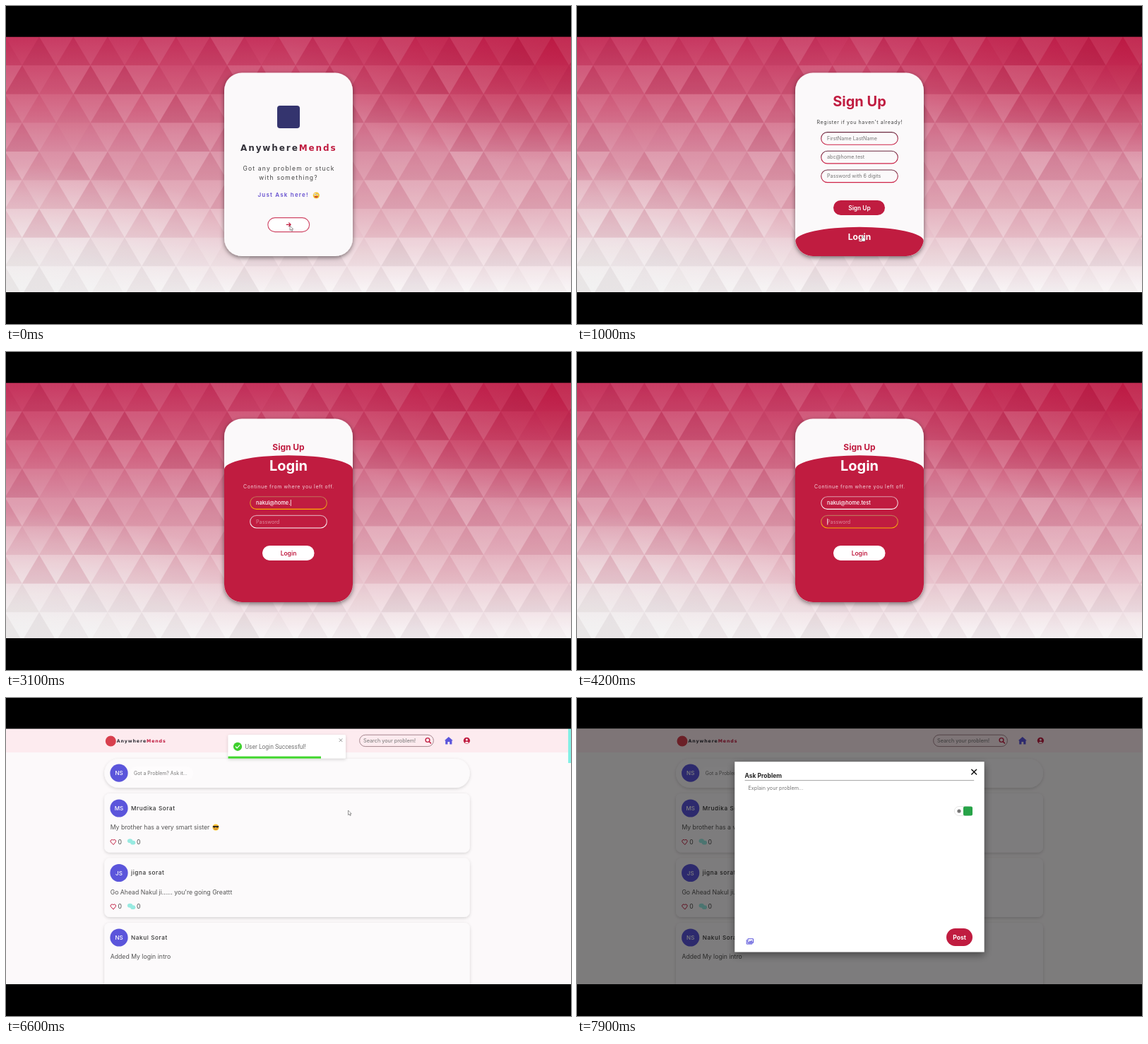
Animation, 800 px wide and 450 px high, one loop 8 s. Source, as an HTML page:

```html
<!DOCTYPE html>
<html lang="en">
<head>
<meta charset="utf-8">
<title>Sign in and ask</title>
<style>
html, body { margin: 0; width: 100%; height: 100%; overflow: hidden; background: #000; }
svg { display: block; width: 800px; height: 450px; }
text { font-family: Inter, "Open Sans", sans-serif; white-space: pre; }
.wide { font-family: "DejaVu Sans", sans-serif; font-weight: 700; }
.toast { font-family: Roboto, sans-serif; }
</style>
</head>
<body>
<svg id="stage" viewBox="0 0 800 450"></svg>
<script>
const LOOP = 8000;
const RED = '#c01c40', PURPLE = '#5b55db', AQUA = '#98eae1';
const EMAIL = 'nakul@home.test';
const stage = document.getElementById('stage');

// Markup helpers. Text is placed by its vertical centre.
const text = (x, y, size, str, fill, o = {}) =>
  `<text x="${x}" y="${y + size * 0.36}" font-size="${size}" fill="${fill}"
    font-weight="${o.w || 400}" letter-spacing="${o.ls || 0}"
    text-anchor="${o.mid ? 'middle' : 'start'}" class="${o.cls || ''}" id="${o.id || ''}">${str}</text>`;
const rect = (x, y, w, h, r, fill, more = '') =>
  `<rect x="${x}" y="${y}" width="${w}" height="${h}" rx="${r}" fill="${fill}" ${more}/>`;
const circle = (x, y, r, fill, more = '') =>
  `<circle cx="${x}" cy="${y}" r="${r}" fill="${fill}" ${more}/>`;
const path = (d, fill, more = '') => `<path d="${d}" fill="${fill}" ${more}/>`;
const line = (d, stroke, width) =>
  path(d, 'none', `stroke="${stroke}" stroke-width="${width}" stroke-linecap="round" stroke-linejoin="round"`);
const group = (id, body, more = '') => `<g id="${id}" ${more}>${body}</g>`;
const ramp = (id, ...stops) =>
  `<linearGradient id="${id}" x1="0" y1="0" x2="0" y2="1">${stops.map(([at, c]) =>
    `<stop offset="${at}" stop-color="${c}"/>`).join('')}</linearGradient>`;
const corner = (id, cx, cy, color, alpha) =>
  `<radialGradient id="${id}" cx="${cx}" cy="${cy}" r=".5">
    <stop offset="0" stop-color="${color}" stop-opacity="${alpha}"/>
    <stop offset="1" stop-color="${color}" stop-opacity="0"/></radialGradient>`;
const shadow = (id, dy, blur, alpha) =>
  `<filter id="${id}" x="-20%" y="-20%" width="140%" height="150%">
    <feDropShadow dx="0" dy="${dy}" stdDeviation="${blur}" flood-opacity="${alpha}"/></filter>`;
const field = (y, stroke, id = '') =>
  rect(345.7, y, 108.6, 17.6, 8.8, 'none', `id="${id}" stroke="url(#${stroke})" stroke-width="1.1"`);
const brand = (x, y, size, ls) =>
  text(x, y, size, `Anywhere<tspan fill="${RED}">Mends</tspan>`, '#34323a', { cls: 'wide', ls });
const page = fill => rect(0, 43.5, 800, 361.5, 0, fill);

// Triangle mesh: those pointing up are mostly darker than those pointing down.
function triangles() {
  let seed = 11, out = '';
  const rnd = () => (seed = seed * 16807 % 2147483647) / 2147483647;
  const side = 48.4, high = 40.6;
  for (let r = 0; r < 9; r++) {
    const y = 43.5 + r * high, y2 = y + high;
    const ink = r > 6 ? '#806872' : '#98143a';
    for (let k = 0; k < 19; k++) {
      const x = -49.8 + k * side - (r % 2) * side / 2;
      const up = `M${x} ${y}L${x + side / 2} ${y2}H${x - side / 2}Z`;
      const down = `M${x} ${y}H${x + side}L${x + side / 2} ${y2}Z`;
      out += path(up, ink, `opacity="${(0.03 + rnd() * (0.15 - r * 0.008)).toFixed(3)}"`);
      out += path(down, '#fff', `opacity="${(rnd() * 0.13).toFixed(3)}"`);
    }
  }
  return out;
}

const defs = `<defs>
  ${ramp('sky', [0, '#c5305a'], [.22, '#d05a7a'], [.45, '#da8ea3'], [.68, '#e5b4c0'], [.88, '#f0dde2'], [1, '#f8f5f6'])}
  ${corner('flush', 1, 0, '#b80a34', .6)}${corner('pale', 0, 1, '#f0f0f0', .9)}
  ${ramp('ink', [0, '#6b2a40'], [1, '#cf2348'])}
  ${ramp('chalk', [0, '#dd9aaa'], [1, '#ffffff'])}
  ${ramp('glow', [0, '#c0705a'], [.5, '#d98a2c'], [1, '#ffb000'])}
  ${shadow('lift', 2, 3, .5)}${shadow('soft', 1.5, 2, .16)}${shadow('pop', 4, 6, .45)}
  <clipPath id="view">${page('#000')}</clipPath>
  <clipPath id="cardClip">${rect(309, 94.5, 182, 259.5, 25, '#000')}</clipPath>
</defs>`;

const intro = group('intro',
  rect(384, 141, 32, 32, 4, '#34346e') +
  brand(332, 200.5, 12, 1.9) +
  text(400.5, 230, 8.5, 'Got any problem or stuck', '#444', { mid: 1, ls: 1.2 }) +
  text(400, 242.5, 8.5, 'with something?', '#444', { mid: 1, ls: 1.2 }) +
  text(356.5, 267.5, 8, 'Just Ask here!', '#6650cf', { w: 600, ls: 1.2 }) +
  circle(439.3, 268, 4.6, '#f4c430') + circle(437.6, 266.6, 1.5, '#fff') + circle(441, 266.8, 1.1, '#fff') +
  circle(437.8, 266.6, .6, '#222') + circle(441, 266.8, .5, '#222') +
  path('M436.5 269.3h5.6a3 3 0 0 1-5.6 0Z', '#c5303c') +
  rect(370.8, 299.6, 58.8, 20, 10, '#fff', 'stroke="#cf4766" stroke-width="1.1"') +
  line('M397.2 309.3H403M400.6 306.9L403.1 309.3L400.6 311.7', RED, 1.2));

const signUp =
  group('signForm',
    text(400.3, 164.5, 7, "Register if you haven't already!", '#444', { mid: 1, ls: .6 }) +
    field(178.6, 'ink') + field(205.3, 'ink') + field(232, 'ink') +
    text(354, 187.4, 7.2, 'FirstName LastName', '#777') +
    text(354, 213.8, 7.2, 'abc@home.test', '#777') +
    text(354, 240.5, 7.2, 'Password with 6 digits', '#777') +
    rect(363, 275, 73, 21, 10.5, RED) +
    text(400, 285.5, 8.4, 'Sign Up', '#fff', { mid: 1, w: 600 })) +
  group('signLabel', text(0, 0, 20, 'Sign Up', RED, { mid: 1, w: 700 }));

const login = group('panel',
  path('M309 166.2A91 20 0 0 1 491 166.2V362H309Z', RED) +
  group('loginLabel', text(0, 0, 20, 'Login', '#fff', { mid: 1, w: 700 })) +
  text(400.3, 190.5, 7, 'Continue from where you left off.', '#f3d3da', { mid: 1, ls: .6 }) +
  field(204.8, 'chalk', 'mailBox') + field(231.4, 'chalk', 'passBox') +
  text(354, 213.4, 7.4, '', '#fff', { w: 500, id: 'mail' }) +
  text(354, 240, 7.2, 'Password', '#dd8a9b', { id: 'passHint' }) +
  group('dots', [0, 1, 2, 3, 4, 5].map(i => circle(355.7 + i * 2.95, 240.2, 1.15, '#fff')).join('')) +
  rect(354, 209, .8, 9, 0, '#fff', 'id="caret"') +
  rect(363.5, 274.5, 72.5, 20, 10, '#fff', 'id="enter" stroke="#fff" stroke-width="1.1"') +
  text(400, 284.5, 8.5, 'Login', RED, { mid: 1, w: 600, id: 'enterText' }));

const welcome = group('welcome',
  page('url(#sky)') + page('url(#flush)') + page('url(#pale)') + triangles() +
  rect(309, 94.5, 182, 259.5, 25, '#fbf9fa', 'filter="url(#lift)"') +
  `<g clip-path="url(#cardClip)">${intro}${group('forms', signUp + login)}</g>`);

const avatar = (x, y, str) =>
  circle(x, y, 12.6, PURPLE) + text(x, y + .2, 8, str, '#fff', { mid: 1, w: 500 });

function post(left, width, y, initials, name, body, height) {
  return rect(left, y, width, height, 8, '#fcfafb', 'filter="url(#soft)"') +
    avatar(left + 20.7, y + 21, initials) +
    text(left + 37.7, y + 21, 8.2, name, '#333', { w: 500, ls: .6 }) +
    text(left + 8.4, y + 48, 8.7, body, '#555') +
    (height > 90 ? '' :
      line(`M${left + 12.5} ${y + 72.3}l-3.2-3.3a2.1 2.1 0 0 1 3.2-2.8a2.1 2.1 0 0 1 3.2 2.8Z`, RED, 1) +
      text(left + 19.3, y + 68.7, 8.7, '0', '#444') +
      `<g fill="${AQUA}"><ellipse cx="${left + 36.3}" cy="${y + 67.2}" rx="3.7" ry="3"/>
       <ellipse cx="${left + 40.4}" cy="${y + 69.7}" rx="3.6" ry="2.9"/></g>` +
      text(left + 45.6, y + 68.7, 8.7, '0', '#444'));
}

// The column is 65% of the page, which widens once the scrollbar goes.
function feed(wide) {
  const left = wide * .175, width = wide * .65, dx = wide - 796;
  return rect(0, 43.5, wide, 33.5, 0, '#fdebef') +
    circle(left + 9, 61, 7.5, '#d8404e') +
    brand(left + 17.5, 60.5, 6.3, .85) +
    rect(500.6 + dx, 52.2, 104.8, 16.4, 8.2, 'none', 'stroke="#a5868e" stroke-width="1"') +
    text(506 + dx, 60.3, 7.3, 'Search your problem!', '#777') +
    circle(597 + dx, 59.5, 2.9, 'none', `stroke="${RED}" stroke-width="1.4"`) +
    line(`M${599.3 + dx} 61.8l2.2 2.2`, RED, 1.5) +
    path(`M${626.8 + dx} 55l6 5.2h-1.4v5.2h-3.2v-3.4h-2.8v3.4h-3.2v-5.2h-1.4Z`, PURPLE) +
    circle(652.4 + dx, 60.3, 4.6, RED) + circle(652.4 + dx, 58.9, 1.5, '#fdebef') +
    path(`M${649.7 + dx} 63.3a2.8 2.2 0 0 1 5.4 0a4 4 0 0 1-5.4 0Z`, '#fdebef') +
    rect(left, 86, width, 41, 20.5, '#fcfafb', 'filter="url(#soft)"') +
    avatar(left + 20.7, 106.2, 'NS') +
    rect(left + 36, 97, 90, 19, 9.5, '#fefcfd') +
    text(left + 41.8, 106.5, 6.9, 'Got a Problem? Ask it...', '#777') +
    post(left, width, 135, 'MS', 'Mrudika Sorat', 'My brother has a very smart sister', 83.5) +
    circle(left + 157.7, 183, 4.6, '#f7c233') +
    path(`M${left + 153.4} 181h8.6l-.9 2.6h-2.4l-1-1.4l-1 1.4h-2.4Z`, '#2b2226') +
    line(`M${left + 155.6} 185.2q2.1 1.5 4.2 0`, '#b5442c', .8) +
    post(left, width, 226.5, 'JS', 'jigna sorat', "Go Ahead Nakul ji...... you're going Greattt", 83.5) +
    post(left, width, 318, 'NS', 'Nakul Sorat', 'Added My login intro', 120);
}

const toast = group('toast',
  rect(314.5, 52, 166.5, 33.6, 1.5, '#fff', 'filter="url(#soft)"') +
  circle(328, 68.8, 6.1, '#3ed02d') + line('M325.3 69l1.9 1.9l3.6-4', '#fff', 1.2) +
  text(338.5, 69, 8.5, 'User Login Successful!', '#757575', { cls: 'toast' }) +
  line('M472 57.7l4 4m0-4l-4 4', '#888', .9) +
  rect(314.5, 82.6, 166.5, 3, 0, '#3fd62d', 'id="bar"'));

const modal = group('modal',
  `<g opacity=".5">${page('#000')}</g>` +
  rect(223.3, 90.2, 353.3, 269.2, 0, '#fff', 'filter="url(#pop)"') +
  text(237.6, 110, 8.5, 'Ask Problem', '#222', { w: 700 }) +
  rect(237.6, 116.2, 324.6, .9, 0, '#999') +
  line('M558.8 101.2l6.8 6.8m0-6.8l-6.8 6.8', '#111', 1.5) +
  text(242.5, 127.7, 7.2, 'Explain your problem...', '#777') +
  rect(534.3, 153.5, 25, 13, 6.5, '#fff', 'stroke="#ddd" stroke-width=".7"') +
  circle(541, 160, 2.6, '#777') + rect(547, 153.5, 13, 13, 2, '#27a348') +
  rect(241.9, 340.8, 7.6, 5.8, .8, 'none', `stroke="${PURPLE}" stroke-width="1.1"`) +
  path('M243 345.5l1.8-2.2l1.1 1.1l1.3-1.8l1.6 2.9Z', PURPLE) +
  line('M240.2 342.5v5.6h7.6', PURPLE, 1) +
  rect(523, 326, 37, 25, 12.5, RED) +
  text(541.5, 338.5, 8.5, 'Post', '#fff', { mid: 1, w: 700 }));

const home = group('home',
  page('#fcf9fa') +
  group('narrow', feed(796) + rect(796, 43.5, 4, 48.5, 0, '#83f0e5')) +
  group('broad', feed(800)) + toast + modal);

const pointer = group('cursor',
  group('arrow', path('M0 0V6.6L1.6 5.2L2.7 7.6L3.7 7.1L2.7 4.9H4.7Z', '#fff', 'stroke="#555" stroke-width=".6"')) +
  group('hand', path('M-.8-3.6a.8.8 0 0 1 1.6 0V-1l2 .5q.7.2.6 1L2.8 4H-.8L-2.8.9q-.3-.8.5-.9l1.5.8Z',
    '#fff', 'stroke="#444" stroke-width=".4"')));

stage.innerHTML = defs + rect(0, 0, 800, 450, 0, '#000') +
  `<g clip-path="url(#view)">${welcome}${home}${pointer}</g>`;

const el = {};
stage.querySelectorAll('[id]').forEach(n => { if (n.id) el[n.id] = n; });
const show = (node, on) => node.setAttribute('visibility', on ? 'inherit' : 'hidden');
const move = (node, x, y, s = 1) => node.setAttribute('transform', `translate(${x} ${y}) scale(${s})`);
const clamp = v => Math.max(0, Math.min(1, v));
const ease = v => v * v * (3 - 2 * v);
const span = (t, from, to) => ease(clamp((t - from) / (to - from)));
const within = (t, ...ranges) => ranges.some(([a, b]) => t >= a && t < b);

const ROUTE = [[0, 402, 311], [300, 402, 311], [900, 405, 329], [1250, 405, 329], [1600, 385, 213],
  [3600, 385, 213], [3950, 380, 240], [5150, 380, 240], [5450, 395, 286], [5950, 395, 286],
  [6350, 484.5, 159], [6650, 484.5, 159], [7150, 225, 107], [LOOP, 225, 107]];

function cursorAt(t) {
  const i = ROUTE.findIndex(p => p[0] > t);
  const [t0, x0, y0] = ROUTE[i - 1], [t1, x1, y1] = ROUTE[i];
  const k = span(t, t0, t1);
  return [x0 + (x1 - x0) * k, y0 + (y1 - y0) * k];
}

function drawWelcome(t) {
  const started = t >= 400;
  show(el.intro, !started);
  show(el.forms, started);
  const k = span(t, 1050, 1750);
  move(el.signLabel, 400, 135, 1 - .4 * k);
  move(el.loginLabel, 400, 160.5, .6 + .4 * k);
  move(el.panel, 0, 166.5 * (1 - k));

  const onMail = within(t, [1700, 3950]), onPass = within(t, [3950, 5600]);
  const typed = Math.max(0, Math.min(EMAIL.length, Math.floor((t - 1740) / 115)));
  const dots = Math.max(0, Math.min(6, Math.floor((t - 4330) / 130)));
  el.mail.textContent = typed ? EMAIL.slice(0, typed) : 'Email';
  el.mail.setAttribute('fill', typed ? '#fff' : '#dd8a9b');
  el.mailBox.setAttribute('stroke', `url(#${onMail ? 'glow' : 'chalk'})`);
  el.passBox.setAttribute('stroke', `url(#${onPass ? 'glow' : 'chalk'})`);
  show(el.passHint, !dots);
  [...el.dots.children].forEach((dot, i) => show(dot, i < dots));

  const typing = within(t, [1740, 3465], [4330, 5110]);
  show(el.caret, (onMail || onPass) && (typing || (t + 50) % 1000 < 500));
  const run = onMail ? (typed ? el.mail.getComputedTextLength() : 0) : dots * 2.95;
  move(el.caret, run + .4, onMail ? 0 : 26.6);

  const hover = t >= 5430;
  el.enter.setAttribute('fill', hover ? RED : '#fff');
  el.enterText.setAttribute('fill', hover ? '#fff' : RED);
}

function drawHome(t) {
  const open = t >= 7450;
  show(el.narrow, !open);
  show(el.broad, open);
  move(el.toast, 0, -60 * (1 - span(t, 5950, 6250)) - 60 * span(t, 7250, 7500));
  el.bar.setAttribute('width', 166.5 * (1 - clamp((t - 5970) / 3000)));
  show(el.modal, open);
  el.modal.setAttribute('opacity', span(t, 7400, 7700));
}

function draw() {
  const t = performance.now() % LOOP;
  const inside = t >= 5950;
  show(el.welcome, !inside);
  show(el.home, inside);
  if (inside) drawHome(t); else drawWelcome(t);

  show(el.cursor, !within(t, [1850, 3600], [4100, 5150], [7450, LOOP]));
  const hand = within(t, [800, 1300], [5430, 5950], [7100, 7450]);
  show(el.hand, hand);
  show(el.arrow, !hand);
  move(el.cursor, ...cursorAt(t));
  requestAnimationFrame(draw);
}
draw();
</script>
</body>
</html>
```
